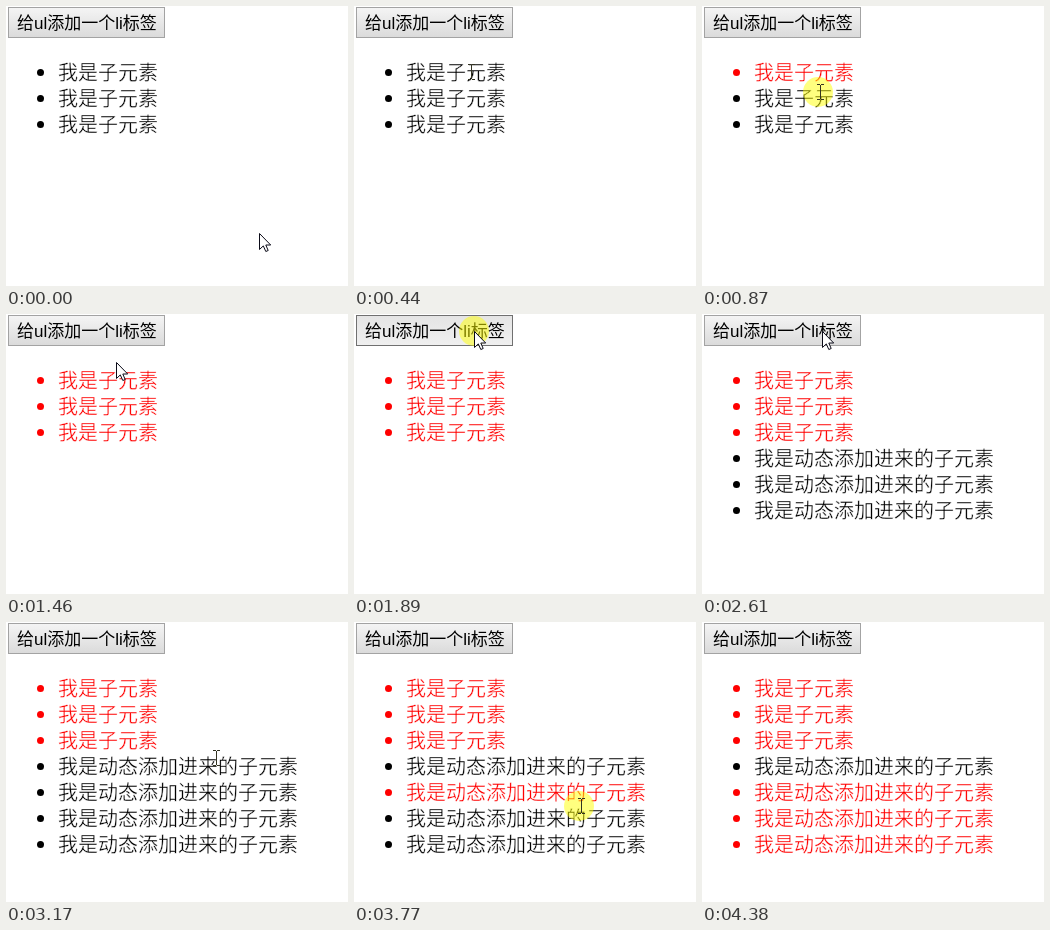
An HTML page with a canvas that plays this animation: 342 px wide and 280 px high, repeating every 4840 ms.

```html
<!DOCTYPE html>
<html lang="zh-CN">
<head>
<meta charset="utf-8">
<style>
html, body { margin: 0; width: 100%; height: 100%; overflow: hidden; background: #fff; }
canvas { display: block; width: 342px; height: 280px; }
</style>
</head>
<body>
<canvas id="stage" width="342" height="280"></canvas>
<script>
const ctx = document.getElementById('stage').getContext('2d');
const LOOP = 4840;
const HOLD = 100;
const FONT = '"Liberation Sans", "Noto Sans CJK SC", "Noto Sans CJK", sans-serif';
const BUTTON = { x: 2, y: 1, w: 157, h: 31 };
const ROW_TOP = 53, ROW_H = 26, TEXT_X = 52, EM = 20;
const OLD = '我是子元素', ADDED = '我是动态添加进来的子元素';

const stop = (at, x, y) => ({ at, x, y });
const click = (at, x, y) => ({ at, x, y, click: true });

// Where the pointer rests and clicks; everything else follows from this.
const stops = [
  stop(0, 254, 228),
  click(490, 115, 66),
  click(870, 116, 86),
  click(1280, 116, 116),
  stop(1460, 110, 48),
  ...[1840, 2250, 2510, 2860].map(at => click(at, 120, 17)),
  click(3390, 224, 157),
  click(3770, 225, 184),
  click(4040, 227, 217),
  stop(4380, 232, 254)
];
const leaveTime = stops[stops.length - 1].at;

const rowAt = y => Math.floor((y - ROW_TOP) / ROW_H);
const onButton = p => p.y < BUTTON.y + BUTTON.h;

function pointerAt(t) {
  const i = stops.findIndex(s => s.at > t);
  const a = stops[i - 1], b = stops[i];
  const leave = a.at + (a.click ? HOLD : 0);
  const p = Math.min(1, Math.max(0, (t - leave) / (0.8 * (b.at - leave))));
  const e = 1 - (1 - p) ** 2;
  return {
    x: Math.round(a.x + (b.x - a.x) * e),
    y: Math.round(a.y + (b.y - a.y) * e),
    down: !!a.click && t < leave
  };
}

// A finished click adds an item or turns the clicked one red.
function itemsAt(t) {
  const items = [OLD, OLD, OLD].map(text => ({ text, color: '#000' }));
  for (const s of stops) {
    if (!s.click || t < s.at + HOLD) continue;
    if (onButton(s)) items.push({ text: ADDED, color: '#000' });
    else items[rowAt(s.y)].color = '#f00';
  }
  return items;
}

function overText(items, { x, y }) {
  const item = items[rowAt(y)];
  return !!item && x >= TEXT_X && x < TEXT_X + item.text.length * EM;
}

function drawButton(pressed, hot) {
  const { x, y, w, h } = BUTTON;
  const fill = ctx.createLinearGradient(0, y, 0, y + h);
  fill.addColorStop(0, pressed ? '#e4e4e4' : '#f5f5f5');
  fill.addColorStop(1, pressed ? '#f0f0f0' : '#dadada');
  ctx.fillStyle = fill;
  ctx.fillRect(x, y, w, h);
  ctx.lineWidth = 1;
  ctx.strokeStyle = pressed || hot ? '#707070' : '#a3a3a3';
  ctx.strokeRect(x + 0.5, y + 0.5, w - 1, h - 1);
  ctx.fillStyle = '#000';
  ctx.font = '17px ' + FONT;
  ctx.fillText('给ul添加一个li标签', 11, 23);
}

function disc(x, y, r, color) {
  ctx.fillStyle = color;
  ctx.beginPath();
  ctx.arc(x, y, r, 0, Math.PI * 2);
  ctx.fill();
}

function drawItem({ text, color }, i) {
  const top = ROW_TOP + i * ROW_H;
  disc(34.5, top + 13.5, 3.5, color);
  ctx.font = EM + 'px ' + FONT;
  ctx.fillText(text, TEXT_X, top + 21);
  // a fine white outline gives the strokes a lighter weight
  ctx.lineWidth = 0.4;
  ctx.strokeStyle = '#fff';
  ctx.strokeText(text, TEXT_X, top + 21);
}

function drawBeam({ x, y }) {
  ctx.fillStyle = '#332';
  ctx.fillRect(x + 2, y - 7, 1, 14);
  for (const edge of [y - 8, y + 7]) {
    ctx.fillRect(x - 1, edge, 3, 1);
    ctx.fillRect(x + 3, edge, 3, 1);
  }
}

const arrow = new Path2D('M.5 .5V16.5L4.3 12.9 6.8 18.5 9.2 17.5 6.8 12H11.7Z');

function drawArrow({ x, y }) {
  ctx.save();
  ctx.translate(x, y);
  ctx.fillStyle = '#fff';
  ctx.fill(arrow);
  ctx.lineWidth = 1;
  ctx.strokeStyle = '#0b0b18';
  ctx.stroke(arrow);
  ctx.restore();
}

function draw(t) {
  ctx.fillStyle = '#fff';
  ctx.fillRect(0, 0, 342, 280);
  const items = itemsAt(t);
  const pos = t < leaveTime ? pointerAt(t) : null;
  // the border stays dark after the first addition
  drawButton(pos && pos.down && onButton(pos), items.length === 4);
  items.forEach(drawItem);
  if (!pos) return;
  if (pos.down) disc(pos.x, pos.y, 15, 'rgba(255, 255, 0, 0.5)');
  (overText(items, pos) ? drawBeam : drawArrow)(pos);
}

const start = performance.now();
function tick() {
  draw((performance.now() - start) % LOOP);
  requestAnimationFrame(tick);
}
tick();
</script>
</body>
</html>
```
